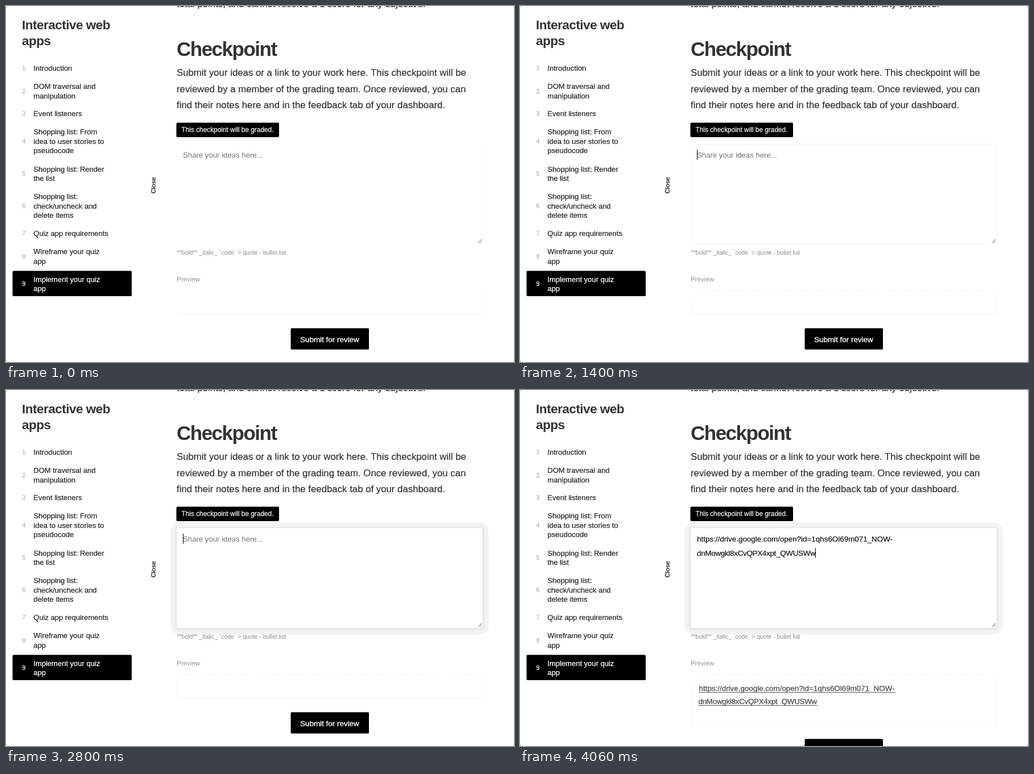
An HTML page that plays this animation: 893 px wide and 627 px high, repeating every 4130 ms.

```html
<!DOCTYPE html>
<html lang="en">
<head>
<meta charset="utf-8">
<title>Checkpoint form</title>
<style>
  html, body { margin: 0; width: 100%; height: 100%; overflow: hidden; background: #fff; }
  svg { display: block; width: 893px; height: 627px; font-family: "Liberation Sans", Arial, sans-serif; }
  text { fill: #2b2b2b; white-space: pre; }
  .title { font-size: 22.5px; font-weight: 700; letter-spacing: -.5px; fill: #333; }
  .head { font-size: 35px; font-weight: 700; letter-spacing: -1.5px; fill: #333; }
  .body { font-size: 16.8px; stroke: #2b2b2b; stroke-width: .15px; }
  .item { font-size: 13px; fill: #222; stroke: #222; stroke-width: .2px; }
  .num { font-size: 10.5px; fill: #a0a0a0; }
  .on { fill: #fff; stroke: #fff; stroke-width: .25px; }
  .close { font-size: 11.5px; font-weight: 700; letter-spacing: -.45px; fill: #333; }
  .pill { font-size: 11.85px; fill: #fff; stroke: #fff; stroke-width: .2px; }
  .hold { font-size: 13.2px; fill: #757575; }
  .hint { font-size: 10.45px; fill: #8c8c8c; }
  .label { font-size: 11.6px; fill: #8c8c8c; }
  .typed { font-size: 13.4px; fill: #111; stroke: #111; stroke-width: .2px; }
  .link { font-size: 13.4px; fill: #4a4a4a; stroke: #4a4a4a; stroke-width: .25px; }
  .tight { letter-spacing: -.28px; }
  .button { font-size: 13.45px; fill: #fff; stroke: #fff; stroke-width: .35px; }
  .edge { fill: none; stroke: #f4f4f4; }
</style>
</head>
<body>
<svg id="stage" viewBox="0 0 893 627">
  <path d="M0 0h2L0 2zM893 0v2l-2-2zM0 627v-2l2 2zM893 627h-2l2-2z" fill="#999"/>
  <g id="side"><rect x="11.5" y="466.5" width="209.5" height="44.5" rx="2"/></g>
  <g id="main"></g>

  <rect x="299.5" y="205.5" width="180.5" height="25.500" rx="2"/>
  <text class="pill" x="308.5" y="222">This checkpoint will be graded.</text>

  <g id="glow"></g>
  <path class="edge" d="M837.5 247V418"/>
  <rect class="edge" id="area" x="300.5" y="243.5" width="537" height="175" rx="3"/>
  <path d="M829.5 417.5l6.5-6.500M833 417.500l3-3" fill="none" stroke="#666"/>
  <text class="hold" id="hold" x="311" y="267">Share your ideas here...</text>
  <g id="typed"></g>
  <rect id="caret" width="1" height="18"/>

  <text class="hint" x="300.500" y="438">**bold** _italic_ `code` &gt; quote - bullet list</text>
  <text class="label" x="300" y="485">Preview</text>
  <path class="edge" id="box"/>
  <g id="boxTop">
    <path class="edge" d="M308 501.500H834" stroke-dasharray="14 12"/>
    <path class="edge" id="boxLeft"/>
  </g>
  <g id="link"></g>
  <g id="submit">
    <rect x="500.5" y="567.5" width="137.5" height="37.5" rx="2"/>
    <text class="button" x="517" y="591.500">Submit for review</text>
  </g>
</svg>
<script>
const LOOP = 4130, PASTE = 3010, FOCUS = 1540;
const $ = id => document.getElementById(id);

function add(parent, tag, attrs, text = '') {
  const el = document.createElementNS('http://www.w3.org/2000/svg', tag);
  for (const key in attrs) el.setAttribute(key, attrs[key]);
  el.textContent = text;
  parent.append(el);
  return el;
}
const write = (parent, cls, x, y, text) => add(parent, 'text', { class: cls, x, y }, text);
const show = (el, on) => el.setAttribute('visibility', on ? 'visible' : 'hidden');

// Sidebar: first baseline, then the lines of each entry
const items = [
  [114, 'Introduction'],
  [146, 'DOM traversal and', 'manipulation'],
  [194, 'Event listeners'],
  [226, 'Shopping list: From', 'idea to user stories to', 'pseudocode'],
  [291.5, 'Shopping list: Render', 'the list'],
  [340, 'Shopping list:', 'check/uncheck and', 'delete items'],
  [405, 'Quiz app requirements'],
  [437, 'Wireframe your quiz', 'app'],
  [485.5, 'Implement your quiz', 'app']
];
const side = $('side'), main = $('main');
write(side, 'title', 28, 41, 'Interactive web');
write(side, 'title', 28, 69, 'apps');
items.forEach(([y, ...lines], i) => {
  const on = i === items.length - 1 ? ' on' : '';
  write(side, 'num' + on, 28.5, y - .7 + (lines.length - 1) * 8.35, i + 1);
  lines.forEach((line, n) => write(side, 'item' + on, 48.3, y + n * 16.7, line));
});
add(side, 'text', { class: 'close', transform: 'translate(263 330.5) rotate(-90)' }, 'Close');

write(main, 'body', 300, 1.5, 'total points, and cannot receive a 1 score for any objective.');
write(main, 'head', 300, 88, 'Checkpoint');
[
  'Submit your ideas or a link to your work here. This checkpoint will be',
  'reviewed by a member of the grading team. Once reviewed, you can',
  'find their notes here and in the feedback tab of your dashboard.'
].forEach((line, i) => write(main, 'body', 300, 123 + i * 28.5, line));

const url = ['https://drive.google.com/open?id=1qhs6Ol69m071_NOW-', 'dnMowgkl8xCvQPX4xpt_QWUSWw'];
url.forEach((line, i) => {
  const tight = i ? ' tight' : '';
  write($('typed'), 'typed' + tight, 311, 267 + i * 25, line);
  write($('link'), 'link' + tight, 314.5 - i, 530 + i * 23, line);
  add($('link'), 'rect', { x: 314 - i, y: 532 + i * 23, width: i ? 210 : 346, height: 1, fill: '#555' });
});

// Focus ring: stepped bands around the text area
const bands = [[9, '#f5f5f5'], [7, '#f3f3f3'], [4, '#eeeeee'], [2, '#e8e8e8'], [1, '#e3e3e3'], [0, '#fff']]
  .map(([size, fill]) => ({ size, el: add($('glow'), 'rect', { fill }) }));

function setGlow(grow) {
  for (const { size, el } of bands) {
    const d = size > 4 ? size + grow : size;
    const box = { x: 300 - d, y: 243 - d + (d > 1 ? 1 : 0), width: 538 + 2 * d, height: 176 + 2 * d, rx: d * 1.3 + 2 };
    for (const key in box) el.setAttribute(key, box[key]);
  }
}

const caretSteps = [[0, false], [1400, true], [1890, false], [2450, true], [3500, false], [4060, true]];

function draw(t) {
  const pasted = t >= PASTE, focused = t >= FOCUS, framed = t >= 70;
  const bottom = pasted ? 589 : 542;

  show($('area'), framed && !focused);
  show($('boxTop'), framed);
  $('box').setAttribute('d', `M837.5 505V${bottom - 2}q0 2.5-2.5 2.5H303`);
  $('boxLeft').setAttribute('d', `M300.5 514V${bottom - 2}q0 2.5 2.5 2.5`);

  show($('glow'), focused);
  setGlow(t < 1680 ? 0 : 2);

  show($('hold'), !pasted);
  show($('typed'), pasted);
  show($('link'), pasted);
  $('submit').setAttribute('transform', `translate(0 ${pasted ? 47 : 0})`);

  show($('caret'), caretSteps.filter(step => step[0] <= t).pop()[1]);
  $('caret').setAttribute('x', pasted ? 519 : 311);
  $('caret').setAttribute('y', pasted ? 278 : 253);
}

const start = performance.now();
function tick() {
  draw((performance.now() - start) % LOOP);
  requestAnimationFrame(tick);
}
tick();
</script>
</body>
</html>
```
